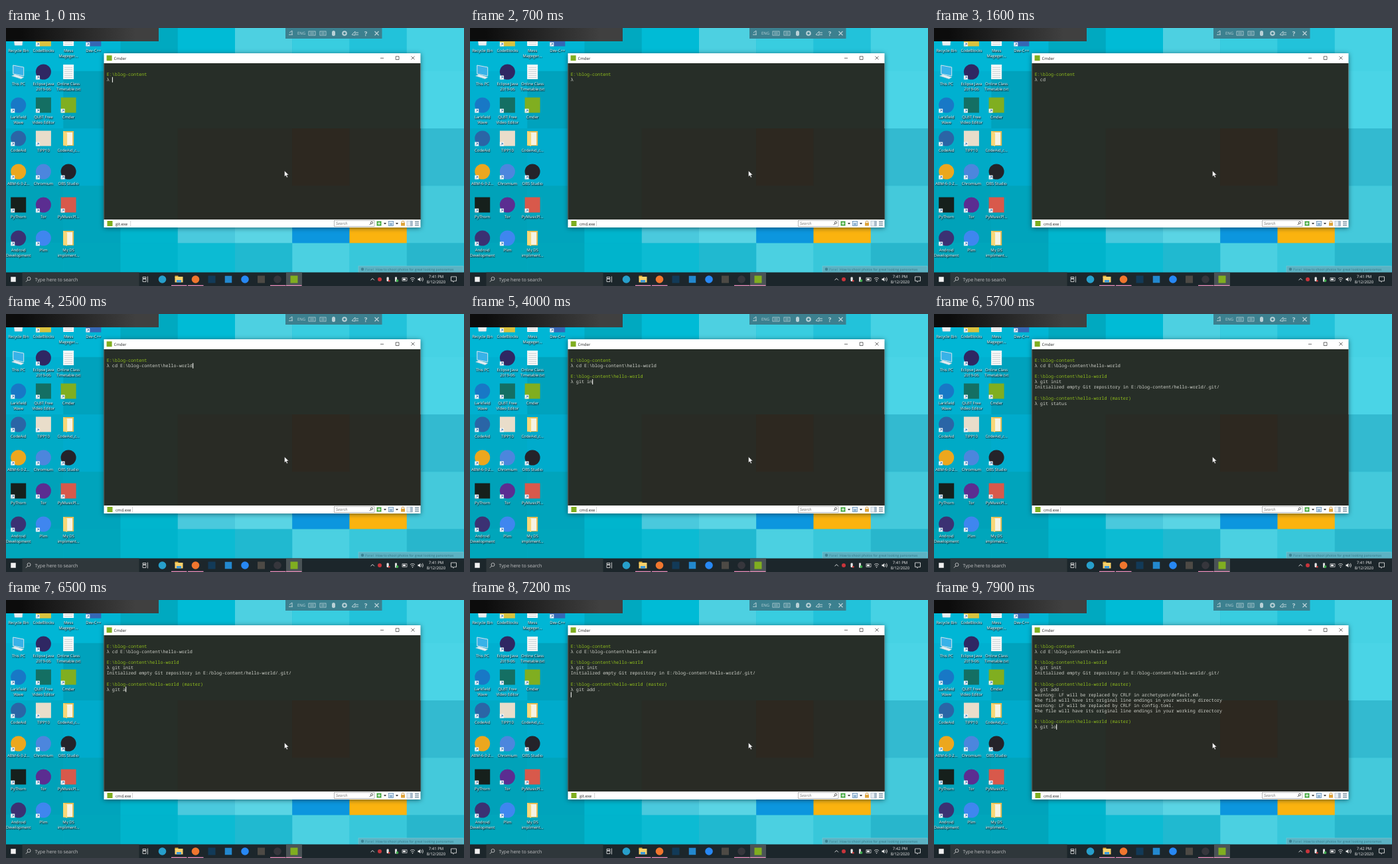
Write an HTML page that moves like this. It is 690 px wide and 388 px high and loops after 8 s.

```html
<!DOCTYPE html>
<html lang="en">
<head>
<meta charset="utf-8">
<title>Terminal session</title>
<style>
html, body { margin: 0; width: 100%; height: 100%; overflow: hidden; background: #08b4d1 }
svg { display: block; width: 100vw; height: 100vh }
text { font-family: "Open Sans", "Noto Sans", sans-serif; text-rendering: geometricPrecision; white-space: pre }
.mono text { font-family: "Noto Sans Mono", "DejaVu Sans Mono", monospace; font-size: 6.735px }
.label { text-shadow: .4px .5px 1px #00202a, .4px .5px 1.5px #00202a }
.window { filter: drop-shadow(0 1.5px 3.5px #001e2899) }
</style>
</head>
<body>
<svg id="stage" viewBox="0 0 690 388" preserveAspectRatio="none"></svg>
<script>
const LOOP = 8000;
const stage = document.getElementById('stage');

function add(tag, attrs, parent = stage) {
  const el = document.createElementNS('http://www.w3.org/2000/svg', tag);
  for (const k in attrs) el.setAttribute(k, attrs[k]);
  return parent.appendChild(el);
}
const rect = (x, y, width, height, fill, more) => add('rect', { x, y, width, height, fill, ...more });
const disc = (cx, cy, r, fill) => add('circle', { cx, cy, r, fill });
const square = (x, y, s, fill) => rect(x - s / 2, y - s / 2, s, s, fill);
const line = (d, stroke, w = 0.8, fill = 'none') => add('path', { d, stroke, fill, 'stroke-width': w });
function text(str, x, y, size, fill, more) {
  const el = add('text', { x, y, 'font-size': size, fill, ...more });
  el.textContent = str;
  return el;
}
const middle = { 'text-anchor': 'middle' };

// ---- wallpaper: 8 columns of square tiles
const TILE = 86.25;
[
  '#00b6d5 #00b6d5 #00a9c0 #00bbd6 #4dd0e1 #38cde0 #22c2da #46d2e4',
  '#00b0d0 #00a2bd #00a5c7 #00bbd6 #06b5d0 #38cde0 #22c2da #4ad4e6',
  '#00aac6 #00abcc #00a5c7 #00bbd6 #06b5d0 #38cde0 #22c2da #33bad0',
  '#00a2b9 #00a4bc #00b5cd #4ac9dd #5ad4e4 #0c96de #fbb30f #44c9db',
  '#00a6bb #00a6bc #00b4cc #0cbbd3 #20b9d0 #4bd0e1 #38c7da #28b6cc'
].forEach((row, j) => row.split(' ').forEach((c, i) =>
  rect(i * TILE, j * TILE - 21.5, TILE + 0.3, TILE + 0.3, c)));

// ---- desktop icons
const monitor = (x, y) => {
  line(`M${x - 8} ${y - 10}l16 3v13l-16 -3z`, '#d5e6ee', 1, '#38b2e8');
  line(`M${x - 10} ${y + 6}l5 -2l13 4l-4 2.5z`, '#b9cfd9', 0.6, '#e3eef3');
};
const folder = (x, y) => {
  rect(x - 8, y - 11, 16, 22, '#e9bd54');
  rect(x - 5, y - 9, 11, 19, '#f6f3e4');
  line(`M${x - 8} ${y - 11}l6 3v20l-6 -2z`, 'none', 0, '#f9d778');
};
const sheet = (x, y) => {
  rect(x - 8, y - 11, 16, 22, '#f5f6f6');
  for (let i = 0; i < 6; i++) rect(x - 6, y - 7 + i * 3, 12, 0.6, '#b9c3c8');
};
const bin = (x, y) => line(`M${x - 8} ${y - 10}h16l-2.5 20h-11z`, '#cbd9df', 0.8, '#e7eff2');
const round = c => (x, y) => disc(x, y, 11.5, c);
const box = c => (x, y) => square(x, y, 23, c);

[
  [0, 0, bin, 'Recycle Bin'],
  [1, 0, box('#d9c23e'), 'CodeBlocks', '', 1],
  [2, 0, sheet, 'Mess', 'Mageger...'],
  [3, 0, box('#3567b5'), 'Dev-C++', '', 1],
  [0, 1, monitor, 'This PC'],
  [1, 1, round('#2f2763'), 'Eclipse Java', '2019-06', 1],
  [2, 1, sheet, 'Online Class', 'Timetable.txt'],
  [0, 2, round('#1878c6'), 'Larkfield', 'Wave', 1],
  [1, 2, box('#146f63'), 'QLBT Free', 'Video Editor', 1],
  [2, 2, box('#80ae20'), 'Cmder', '', 1],
  [0, 3, round('#2a65a6'), 'CodeAid', '', 1],
  [1, 3, box('#e9ddca'), 'TIPP10', '', 1],
  [2, 3, folder, 'CodeAid_c...'],
  [0, 4, round('#eca71e'), 'ABM-6-3-2...', '', 1],
  [1, 4, round('#4c86dd'), 'Chromium', '', 1],
  [2, 4, round('#24232a'), 'OBS Studio', '', 1],
  [0, 5, box('#16201c'), 'PyThorn', '', 1],
  [1, 5, round('#5b2d91'), 'Tor', '', 1],
  [2, 5, box('#d8594b'), 'PyMusicPl...', '', 1],
  [0, 6, round('#3b3173'), 'Android', 'Development', 1],
  [1, 6, round('#3f86ef'), 'Plim', '', 1],
  [2, 6, folder, 'My DS', 'impliment...']
].forEach(([col, row, draw, top, bottom = '', link]) => {
  const x = 18.7 + col * 37.7, y = 16 + row * 50;
  draw(x, y);
  if (link) {
    rect(x - 11.5, y + 5.5, 6, 6, '#f4f8fa');
    line(`M${x - 10} ${y + 10.2}l3 -3m-2.2 0h2.2v2.2`, '#2569a8', 0.8);
  }
  const style = { ...middle, class: 'label' };
  text(top, x, y + 20, 5.95, '#fff', style);
  text(bottom, x, y + 28, 5.95, '#fff', style);
});

// ---- overlays along the top
const fade = add('linearGradient', { id: 'fade' });
add('stop', { offset: 0.1, 'stop-color': '#0c0c0c' }, fade);
add('stop', { offset: 0.85, 'stop-color': '#404040' }, fade);
rect(0, 0, 230, 20, 'url(#fade)');

rect(421, 0, 145.5, 16, '#3c808f');
const pale = '#b9d0d6';
line('M426 10h6m-5 -3l4 -3v6', pale, 1);
text('ENG', 445, 10.4, 6, pale, middle);
rect(456, 5, 10, 6, 'none', { stroke: pale, 'stroke-width': 0.8 });
line('M458 7h6m-6 2h6', pale, 0.7);
rect(473, 5, 9, 6, 'none', { stroke: pale, 'stroke-width': 0.8 });
line('M475 7h5m-5 2h5', pale, 0.7);
rect(491, 4, 5, 8, pale, { rx: 2.5 });
add('circle', { cx: 510, cy: 8, r: 2.8, fill: 'none', stroke: pale, 'stroke-width': 2 });
line('M521 10l5 -5v6zm6 -3h4m-4 3h4', pale, 1);
text('?', 542, 11.5, 9.5, pale, { ...middle, 'font-weight': 700 });
line('M555.5 5l6 6m0 -6l-6 6', pale, 1.3);

// ---- tip strip
rect(531, 358, 158, 9.5, '#5cb2c3', { stroke: '#86cbd7', 'stroke-width': 0.5 });
disc(537, 362.8, 2.2, '#3a8394');
text('Panel', 541, 364.8, 5, '#3a8394');
text('How to shoot photos for great looking panoramas', 557, 364.8, 5.05, '#2f7484');

// ---- terminal window
rect(147.5, 38, 477, 262, '#fff', { class: 'window' });
rect(147.5, 53, 477, 235, '#272e28');
rect(258.7, 151, 365.8, 137, '#292b25');
rect(431.2, 151, TILE, TILE, '#2d2820');
rect(147.5, 53, 0.8, 235, '#454c46');
square(155.6, 45.2, 8, '#80ae20');
text('Cmder', 162.5, 47.5, 6, '#222');
line('M564 45.3h5M587.2 42.7h4.8v4.8h-4.8zM610.5 42.5l5 5m0 -5l-5 5', '#222', 0.65);

square(156.5, 294, 8, '#80ae20');
const tab = text('', 165, 296.5, 6, '#222');
const tabEnd = rect(188, 289.5, 0.6, 9, '#bbb');
rect(494.5, 289.3, 60.5, 9, '#fff', { stroke: '#8b8b8b', 'stroke-width': 0.6 });
text('Search', 497, 296, 5.9, '#777', { 'font-style': 'italic' });
add('circle', { cx: 551, cy: 292.8, r: 1.6, fill: 'none', stroke: '#444', 'stroke-width': 0.8 });
line('M549.8 294l-2 2', '#444', 1);
square(562, 294, 7, '#49ac45');
line('M559.8 294h4.4m-2.2 -2.2v4.4', '#fff', 1.1);
for (const x of [569, 587]) line(`M${x} 293h4l-2 2.5z`, 'none', 0, '#333');
rect(576.5, 290.5, 7, 7, '#d9e7f3', { stroke: '#6290b8', 'stroke-width': 0.8 });
rect(578, 293.5, 4, 3, '#88afcf');
rect(595, 293, 6, 4.5, '#e0a43a');
line('M596.2 293v-1.2a1.8 1.8 0 0 1 3.6 0v1.2', '#c88c2a', 0.9);
rect(604, 290, 8.5, 8, '#e7eef4', { stroke: '#9ab0c0', 'stroke-width': 0.6 });
rect(609, 290, 3.5, 8, '#a9bccb');
line('M616 291.5h6m-6 2.5h6m-6 2.5h6', '#4e7186', 1);

// ---- taskbar
rect(0, 367.5, 690, 20.5, '#1c262b');
square(11, 378, 7.5, '#f0f0f0');
rect(24.5, 367.5, 176, 20.5, '#2f373b');
add('circle', { cx: 34.5, cy: 377, r: 2.5, fill: 'none', stroke: '#d8d8d8', 'stroke-width': 0.8 });
line('M32.6 379l-2.6 2.7', '#d8d8d8', 0.9);
text('Type here to search', 43.5, 380.6, 7.1, '#c2c3c5');
line('M206 374.5h5v2h-5zm0 7h5v-4h-5zm7.5 -8v9', '#e4e4e4', 0.8);
rect(422, 367.5, 24, 20.5, '#4a5356');
disc(235.5, 378, 5.8, '#279fcb');
rect(254.5, 372.5, 5, 3, '#dea72f');
rect(254.5, 374, 12, 8.5, '#f7d06a');
rect(257, 379, 7, 3.5, '#3e9bdc');
disc(285.5, 378, 5.8, '#f0762e');
square(310, 378, 11, '#123a58');
square(335, 378, 10.5, '#2388ce');
disc(360, 378, 5.8, '#2788f4');
square(384.5, 378, 11, '#4d4a45');
disc(409, 378, 5.8, '#36363c');
square(434, 378, 11, '#80ae20');
for (const x of [249, 274, 398, 422]) rect(x, 386.7, 23.5, 1.3, '#e58bb8');

line('M549.5 379.3l2.7 -2.7l2.7 2.7', '#eee', 0.9);
disc(563, 378, 3, '#c9343b');
rect(573.5, 374.5, 3.2, 6.5, '#e8e8e8', { rx: 1.2 });
rect(576, 379, 2.5, 2.5, '#cf3e3e');
rect(586, 374.5, 3, 7, '#ddd');
disc(589.5, 380, 1.9, '#3caa4b');
rect(597, 375.8, 7, 4.4, 'none', { stroke: '#eee', 'stroke-width': 0.7 });
rect(598, 376.8, 4, 2.4, '#eee');
line('M609 377a5 5 0 0 1 7 0m-5.6 1.9a3 3 0 0 1 4.2 0', '#eee', 0.8);
disc(612.5, 380.8, 0.8, '#eee');
line('M620.5 376.8h1.8l2 -2v6.5l-2 -2h-1.8z', 'none', 0, '#eee');
line('M625.8 376a3 3 0 0 1 0 4m1.5 -5.3a5 5 0 0 1 0 6.6', '#eee', 0.7);
const clock = text('', 648, 375.6, 6, '#f2f2f2', middle);
text('8/12/2020', 648, 384.2, 6, '#f2f2f2', middle);
line('M670.5 374h8v6.4h-3l-1.6 1.8v-1.8h-3.4z', '#eee', 0.8);

// ---- console contents
const CHAR = 4.041, LEFT = 151.8, TOP = 72, LINE = 8.08;
const consoleBox = add('g', { class: 'mono' });
const rows = Array.from({ length: 16 }, (_, i) =>
  add('text', { x: LEFT, y: TOP + i * LINE }, consoleBox));
const caret = add('rect', { width: 1.1, height: 8, fill: '#f1f1ee' });
line('M419.5 214.8v8.8l2 -1.9l1.5 3.2l1.5 -.7l-1.5 -3.1h2.9z', '#222', 0.5, '#fff');

const HOME = 'E:\\blog-content', REPO = HOME + '\\hello-world';
const typed = (str, t, start, step) =>
  str.slice(0, Math.max(0, Math.floor((t - start) / step) + 1));

function command(t) {
  if (t < 6000) return typed('git status', t, 4780, 90);
  if (t < 6450) return 'git status'.slice(0, 10 - Math.floor((t - 5930) / 80));
  return 'git ' + typed('add .', t, 6500, 100);
}

function session(t) {
  const cd = t < 1950 ? typed('cd ', t, 1100, 200) : 'cd ' + REPO;
  const out = [HOME, 'λ ' + cd];
  if (t < 2950) return out;
  out.push('', REPO, 'λ ' + typed('git init', t, 3480, 100));
  if (t < 4480) return out;
  out.push(t < 4550 ? '' : 'Initialized empty Git repository in E:/blog-content/hello-world/.git/');
  if (t < 4650) return out;
  out.push('', REPO + ' (master)', 'λ ' + command(t));
  if (t < 7150) return out;
  if (t < 7350) return [...out, ''];
  for (const file of ['archetypes/default.md', 'config.toml'])
    out.push(`warning: LF will be replaced by CRLF in ${file}.`,
      'The file will have its original line endings in your working directory');
  if (t < 7400) return [...out, ''];
  return [...out, '', REPO + ' (master)', 'λ ' + typed('git lo', t, 7450, 80)];
}

function draw(now) {
  const t = now % LOOP;
  const lines = session(t);
  rows.forEach((el, i) => {
    const str = lines[i] || '';
    if (el.textContent !== str) el.textContent = str;
    el.setAttribute('fill', str.startsWith('E:') ? '#90bf1c' : '#d0d2cb');
  });
  const last = lines.length - 1;
  caret.setAttribute('x', LEFT + lines[last].length * CHAR);
  caret.setAttribute('y', TOP + last * LINE - 6.3);
  const blink = t % 1000;
  caret.setAttribute('opacity', blink >= 550 && blink < 880 ? 0 : 1);

  const git = t < 400 || (t >= 4480 && t < 4650) || (t >= 7150 && t < 7400);
  tab.textContent = git ? 'git.exe' : 'cmd.exe';
  tabEnd.setAttribute('x', git ? 187.5 : 190);
  clock.textContent = t < 6600 ? '7:41 PM' : '7:42 PM';
  requestAnimationFrame(() => draw(performance.now()));
}
draw(0);
</script>
</body>
</html>
```
